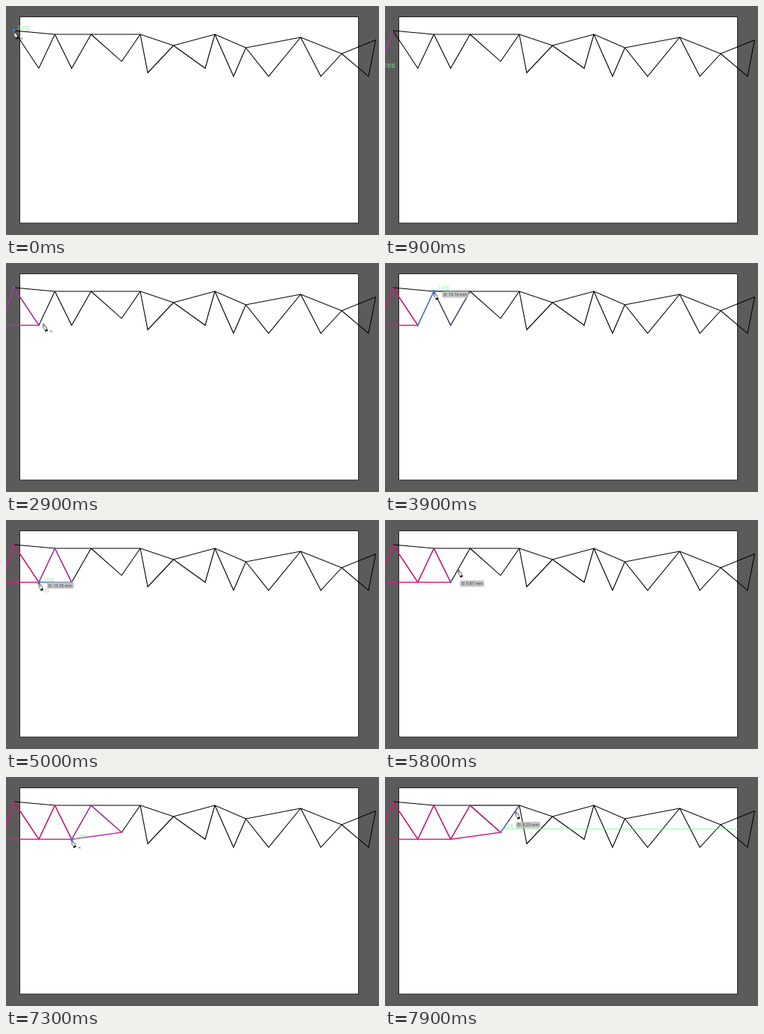
An HTML page with a canvas that plays this animation: 500 by 307 pixels, repeating every 8 s.

```html
<!DOCTYPE html>
<html lang="ko">
<head>
<meta charset="utf-8">
<style>
html, body { margin: 0; width: 100%; height: 100%; overflow: hidden; background: #5b5b5b; }
canvas { display: block; }
</style>
</head>
<body>
<canvas id="stage" width="500" height="307"></canvas>
<script>
const ctx = document.getElementById('stage').getContext('2d');
const LOOP = 8000, STEP = 100, PX_PER_MM = 3.32;
const CLICK_GAP = 550, ARRIVE = 150, LEAVE = 50, LABEL_LAG = 100;
const GRAY = '#5b5b5b', BLUE = '#4a78e8', GREEN = '#7cf08c', HOVER = '#50507c';

// The garland: its upper string and the tip of each flag
const crest = [[10.5, 33], [65.5, 38], [114, 38], [180, 38], [224.5, 53], [280, 38],
  [321.5, 56], [395, 42], [450, 64], [495.5, 45.5]];
const tips = [[44, 83.5], [88, 83.5], [155, 74.3], [190, 89.5], [267, 83.5], [305, 94.3],
  [352, 94.3], [422, 94.3], [486, 94.3]];
const corner = [-7, 83.5];
const flags = tips.map((tip, i) => [crest[i], tip, crest[i + 1]]);
const anchors = [...crest, ...tips, corner];

// Triangles are traced between the flags, one click per corner at a steady pace
const tracings = [300, 3400, 5600, 7600].map((start, i) => {
  const points = i
    ? [tips[i - 1], crest[i], tips[i], tips[i - 1]]
    : [crest[0], corner, tips[0], crest[0]];
  return points.map((point, k) => ({ time: start + k * CLICK_GAP, point }));
});
const rest = { time: 2900, point: [50, 80.5] };
const stops = [...tracings.flat(), rest].sort((a, b) => a.time - b.time);

const dist = (a, b) => Math.hypot(a[0] - b[0], a[1] - b[1]);

function pointerAt(t) {
  const n = stops.findIndex(s => s.time + LEAVE >= t);
  const next = stops[n], prev = stops[n - 1] || next;
  const from = prev.time + LEAVE, to = next.time - ARRIVE;
  if (prev === next || t >= to) return next.point;
  const k = (t - from) / (to - from), e = k * k * (3 - 2 * k);
  return prev.point.map((v, j) => v + (next.point[j] - v) * e);
}

function line(points, color, width = 1.1, fill) {
  ctx.beginPath();
  points.forEach(p => ctx.lineTo(...p));
  if (fill) {
    ctx.closePath();
    ctx.fillStyle = fill;
    ctx.fill();
  }
  ctx.strokeStyle = color;
  ctx.lineWidth = width;
  ctx.stroke();
}

function dot([x, y], size) {
  ctx.fillStyle = BLUE;
  ctx.fillRect(x - size / 2, y - size / 2, size, size);
}

function text(s, x, y, color, size = 6) {
  ctx.font = `${size}px "Noto Sans CJK KR", "Noto Sans CJK", sans-serif`;
  ctx.textBaseline = 'middle';
  ctx.fillStyle = color;
  ctx.fillText(s, x, y);
}

function distanceLabel(length, [x, y]) {
  const s = `D: ${(length / PX_PER_MM).toFixed(2)} mm`;
  ctx.font = '5.6px Roboto, sans-serif';
  ctx.textBaseline = 'middle';
  ctx.fillStyle = 'rgba(190,190,190,.9)';
  ctx.beginPath();
  ctx.roundRect(x + 11, y, ctx.measureText(s).width + 4, 8.5, 2);
  ctx.fill();
  ctx.fillStyle = '#444';
  ctx.fillText(s, x + 13, y + 4.5);
}

function pen([x, y], mark) {
  ctx.save();
  ctx.translate(x, y + 1);
  line([[0, 0], [4, 4], [5, 8], [3, 9], [0, 5]], '#333', 0.8, '#fff');
  line([[0, 0], [2.5, 5]], '#333', 0.6);
  line([[2.5, 9.8], [5.8, 8.2]], '#000', 2);
  ctx.restore();
  text(mark, x + 8, y + 10.5, '#222', 5);
}

function draw(t) {
  const pointer = pointerAt(t);
  ctx.fillStyle = GRAY;
  ctx.fillRect(0, 0, 500, 307);
  line([[18.5, 14.5], [472.5, 14.5], [472.5, 291], [18.5, 291]], '#222', 1, '#fff');

  [crest, ...flags].forEach(p => line(p, '#000'));
  const hovered = flags.slice(1).find(([a, , b]) => dist(a, pointer) < 9 || dist(b, pointer) < 9);
  if (hovered) line([...hovered, hovered[0]], HOVER, 1.2);

  const started = tracings.filter(clicks => t >= clicks[0].time);
  const drawn = started.map(clicks => clicks.filter(c => t >= c.time).map(c => c.point));
  drawn.forEach((points, i) => {
    const current = i === drawn.length - 1;
    line(points, current ? '#b832a6' : '#dc1a80', 1.4);
  });

  const active = drawn[drawn.length - 1] || [];
  const last = active[active.length - 1];
  const open = active.length > 0 && active.length < 4;
  if (last) dot(last, 2.5);

  const hit = anchors.find(a => dist(a, pointer) < 2);
  if (hit) {
    dot(hit, 3.6);
    text('고정점', hit[0] + 4, hit[1] - 4, GREEN);
  }

  // The preview and its label trail the pointer slightly
  const trail = pointerAt(t - LABEL_LAG);
  const reach = open ? dist(last, trail) : 0;
  if (reach > 1) {
    line([last, trail], BLUE, 1.3);
    if (t >= 7800) {
      line([[155, 69.8], [473, 69.8]], GREEN, 0.8);
      text('교차 영역', 162, 66, GREEN);
    }
    distanceLabel(reach, trail);
  }

  const closing = active.length === 3 && dist(pointer, active[0]) < 2;
  pen(pointer, closing ? '○' : open ? '' : '×');
}

const begin = performance.now();
function tick() {
  const t = (performance.now() - begin) % LOOP;
  draw(Math.floor(t / STEP) * STEP);
  requestAnimationFrame(tick);
}
tick();
</script>
</body>
</html>
```
